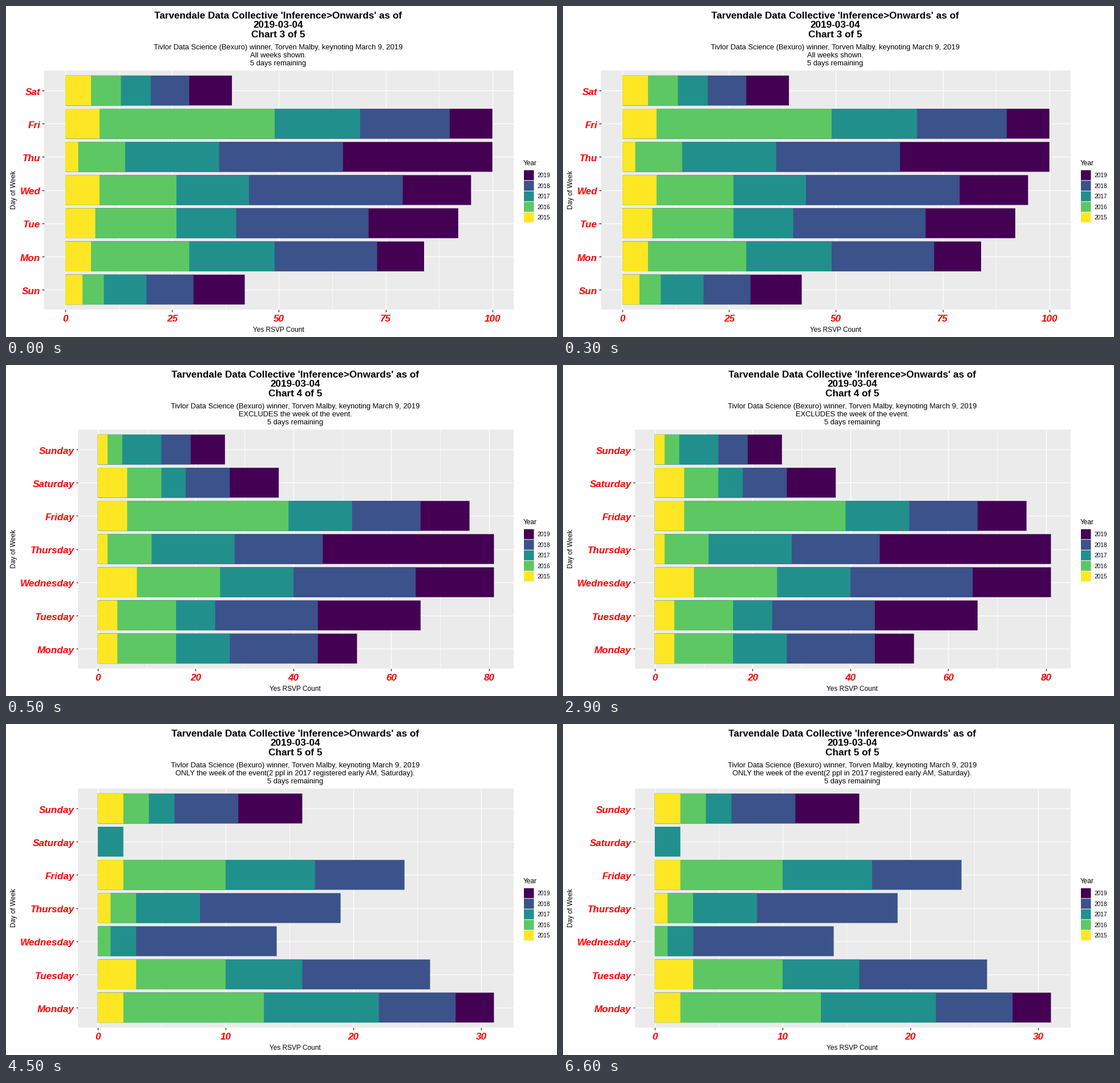
A matplotlib script for the animation above (8 s loop, 966 by 580 pixels).

```python
import matplotlib.pyplot as plt
import numpy as np
from matplotlib.animation import FuncAnimation
from matplotlib.patches import Rectangle

W, H, DPI = 966, 580, 100
STEP = 500  # ms per frame
TOP, BOTTOM, RIGHT = 113.2, 531.8, 890.2
ROW = (BOTTOM - TOP) / 7.2

YEARS = [2015, 2016, 2017, 2018, 2019]
COLORS = ["#FDE725", "#5DC863", "#21908C", "#3B528B", "#440154"]
DAYS = ["Monday", "Tuesday", "Wednesday", "Thursday", "Friday",
        "Saturday", "Sunday"]

# Rows follow DAYS, columns follow YEARS.
EARLY = np.array([
    [4, 12, 11, 18, 8],
    [4, 12, 8, 21, 21],
    [8, 17, 15, 25, 16],
    [2, 9, 17, 18, 35],
    [6, 33, 13, 14, 10],
    [6, 7, 5, 9, 10],
    [2, 3, 8, 6, 7],
])
EVENT_WEEK = np.array([
    [2, 11, 9, 6, 3],
    [3, 7, 6, 10, 0],
    [0, 1, 2, 11, 0],
    [1, 2, 5, 11, 0],
    [2, 8, 7, 7, 0],
    [0, 0, 2, 0, 0],
    [2, 2, 2, 5, 5],
])
ALL_WEEKS = np.roll(EARLY + EVENT_WEEK, 1, axis=0)
SHORT_DAYS = [d[:3] for d in DAYS[-1:] + DAYS[:-1]]

CHARTS = [
    dict(num=3, data=ALL_WEEKS, days=SHORT_DAYS, left=66.7, step=25,
         note="All weeks shown."),
    dict(num=4, data=EARLY, days=DAYS, left=126.2, step=20,
         note="EXCLUDES the week of the event."),
    dict(num=5, data=EVENT_WEEK, days=DAYS, left=126.2, step=10,
         note="ONLY the week of the event(2 ppl in 2017 registered "
              "early AM, Saturday)."),
]

plt.rcParams["font.family"] = "Liberation Sans"
fig = plt.figure(figsize=(W / DPI, H / DPI), dpi=DPI, facecolor="white")
ax = fig.add_axes([0, 0, 1, 1])


def text(x, y, s, px, ha="center", **kw):
    ax.text(x, y, s, fontsize=px * 72 / DPI, ha=ha, va="baseline",
            rotation_mode="anchor", **{"color": "black", **kw})


def rect(x, y, w, h, color, z):
    ax.add_patch(Rectangle((x, y), w, h, fc=color, lw=0, zorder=z,
                           snap=False))


def line(x0, y0, x1, y1, px, color="white"):
    ax.plot([x0, x1], [y0, y1], color=color, lw=px * 72 / DPI,
            solid_capstyle="butt", zorder=2)


def tick_label(x, y, s, ha):
    text(x, y, s, 17.15, ha, color="red", weight="bold", style="italic")


def draw_titles(chart, cx):
    title = ["Tarvendale Data Collective 'Inference>Onwards' as of",
             "2019-03-04", f"Chart {chart['num']} of 5"]
    subtitle = ["Tivlor Data Science (Bexuro) winner, Torven Malby, "
                "keynoting March 9, 2019", chart["note"],
                "5 days remaining"]
    for i, s in enumerate(title):
        text(cx, 22 + 16.5 * i, s, 17.1, weight="bold")
    for i, s in enumerate(subtitle):
        text(cx, 76.3 + 14 * i, s, 12.85)
    text(cx, 570.7, "Yes RSVP Count", 11.9)
    text(17, 322.5, "Day of Week", 11.9, rotation=90)


def draw_panel(chart):
    left, step, data = chart["left"], chart["step"], chart["data"]
    peak = data.sum(axis=1).max()
    scale = (RIGHT - left) / (1.1 * peak)
    zero = left + 0.05 * peak * scale

    rect(left, TOP, RIGHT - left, BOTTOM - TOP, "#EBEBEB", 1)
    for v in np.arange(step / 2, 1.05 * peak, step):
        line(zero + v * scale, TOP, zero + v * scale, BOTTOM, 0.7)
    for v in range(0, peak + 1, step):
        x = zero + v * scale
        line(x, TOP, x, BOTTOM, 1.4)
        line(x, BOTTOM, x, BOTTOM + 3.7, 1.4, "#333333")
        tick_label(x, 553.3, str(v), "center")

    for i, (day, counts) in enumerate(zip(chart["days"], data)):
        y = BOTTOM - (0.6 + i) * ROW
        line(left, y, RIGHT, y, 1.4)
        line(left - 3.7, y, left, y, 1.4, "#333333")
        tick_label(left - 6.3, y + 7.8, day, "right")
        # Longest first, so neighbouring colours meet without a seam.
        totals = np.cumsum(counts) * scale
        for n, width, color in list(zip(counts, totals, COLORS))[::-1]:
            if n:
                rect(zero, y - 0.45 * ROW, width, 0.9 * ROW, color, 3)


def draw_legend():
    size = 18.5
    text(907, 279, "Year", 11.9, "left")
    for i, (year, color) in enumerate(zip(YEARS[::-1], COLORS[::-1])):
        y = 287.2 + size * i
        rect(908, y + 0.5, size - 1, size - 1, color, 3)
        text(931, y + 13.2, str(year), 10.1, "left")


def draw(frame):
    t = frame * STEP
    chart = CHARTS[0 if t < 500 else 1 if t < 4500 else 2]
    ax.clear()
    ax.set(xlim=(0, W), ylim=(H, 0))
    ax.axis("off")
    draw_titles(chart, (chart["left"] + RIGHT) / 2 - 1)
    draw_panel(chart)
    draw_legend()
    return []


anim = FuncAnimation(fig, draw, frames=8000 // STEP, interval=STEP,
                     init_func=lambda: [], repeat=True, repeat_delay=0)
plt.show()
```
